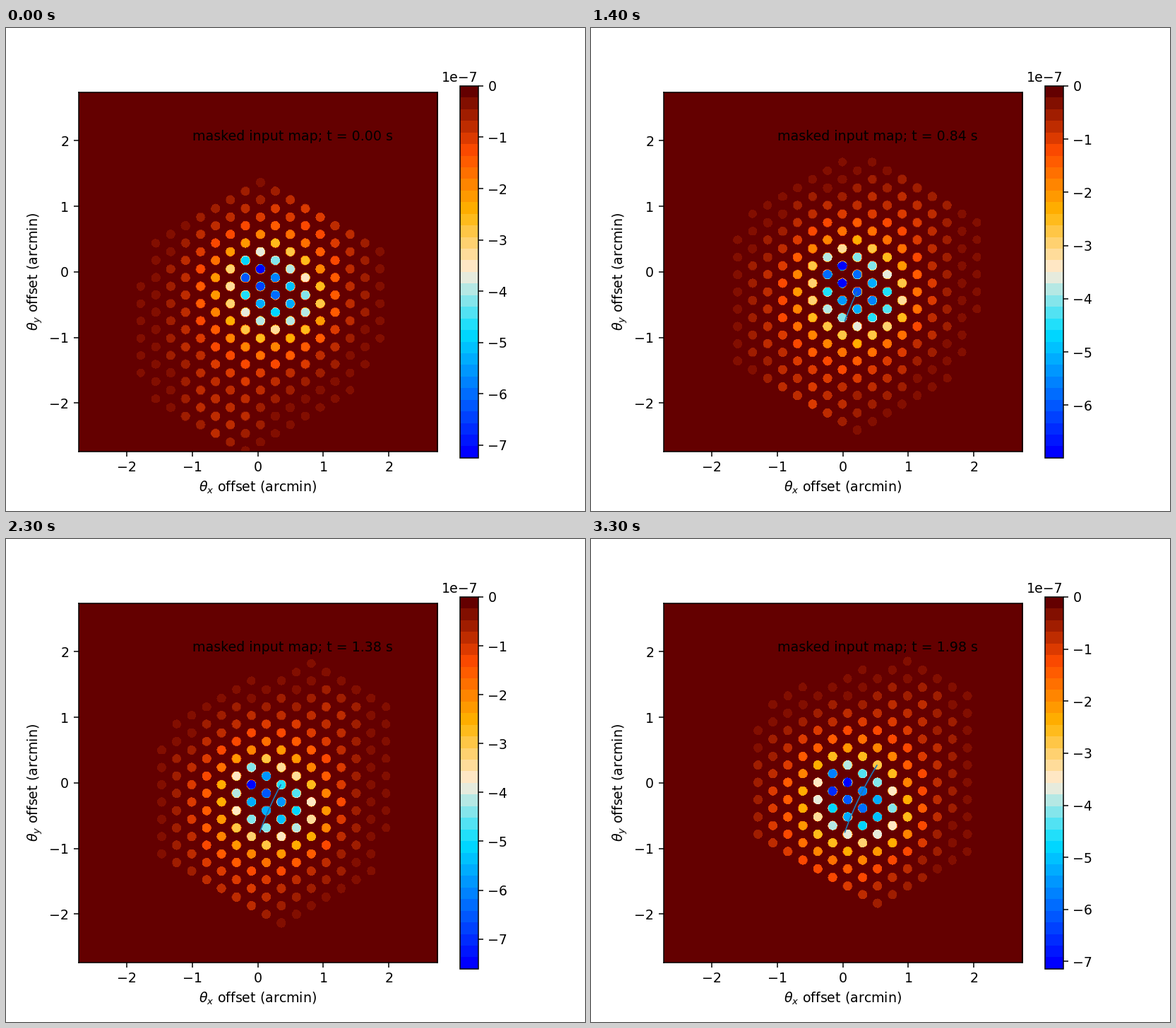
A matplotlib script that plays this animation: 820 by 683 pixels, repeating every 3.4 s.

```python
import numpy as np
import matplotlib.pyplot as plt
from matplotlib.animation import FuncAnimation
from matplotlib.colors import LinearSegmentedColormap

DPI = 820 / 6
FRAMES, INTERVAL, DT = 34, 100, 0.06
HALF = 2.74              # half width of the map, arcmin
GRID = 550               # map samples per side
PITCH = 0.2633           # detector spacing, arcmin
COL = PITCH * np.sqrt(3) / 2
RINGS, RADIUS = 8, 0.071

SKY = LinearSegmentedColormap.from_list(
    "sky", ["#0000ff", "#0070ff", "#00ddff", "#ffedd9", "#ffb400", "#ff4b00", "#640000"], N=32)


def bump(x, y, x0, y0, width):
    return np.exp(-((x - x0) ** 2 + (y - y0) ** 2) / (2 * width ** 2))


def signal(x, y):
    """Depth of the map: a broad beta profile with a core, a shoulder and wings."""
    r2 = (x - 0.143) ** 2 + (y + 0.27) ** 2
    halo = 5.5 * (1 + r2 / 1.08 ** 2) ** -2.25
    core = 3.3 * bump(x, y, -0.072, 0.011, 0.162)
    shoulder = 1.3 * bump(x, y, 0.64, -0.507, 0.30)
    clump = 0.45 * bump(x, y, -0.61, -2.23, 0.33)
    tail = 0.35 * bump(x, y, -0.5, -1.7, 0.9)
    wing = 0.42 * bump(x, y, 1.2, 1.1, 0.5)
    return 1e-7 * (halo + core + shoulder + clump + tail + wing)


def center(step):
    """Slightly curved scan of the array over the sky."""
    x = 0.030 + 0.01165 * step + 0.000097 * step ** 2
    y = -0.751 + 0.03247 * step - 0.0000485 * step ** 2
    return x, y


axis = (np.arange(GRID) + 0.5) / GRID * 2 * HALF - HALF
gx, gy = np.meshgrid(axis, axis)


def masked_map(step):
    """Map seen through the hexagonal detector array."""
    cx, cy = center(step)
    u, v = (gx - cx) / COL, (gy - cy) / PITCH
    col = np.round(u)
    shift = col % 2 / 2
    row = np.round(v - shift) + shift
    inside = (abs(col) <= RINGS) & (abs(row) + abs(col) / 2 <= RINGS)
    seen = inside & (np.hypot((u - col) * COL, (v - row) * PITCH) < RADIUS)
    data = np.zeros_like(gx)
    data[seen] = -signal(cx + col[seen] * COL, cy + row[seen] * PITCH)
    return data


fig, ax = plt.subplots(figsize=(820.001 / DPI, 683.001 / DPI), dpi=DPI)
start = masked_map(0)
image = ax.imshow(start, cmap=SKY, vmin=start.min(), vmax=0, origin="lower",
                  extent=(-HALF, HALF, -HALF, HALF))
fig.colorbar(image)
track, = ax.plot([], [], color="C0", lw=0.9)
label = ax.text(-1, 2, "")
ax.set(xlim=(-HALF, HALF), ylim=(-HALF, HALF),
       xlabel=r"$\theta_x$ offset (arcmin)", ylabel=r"$\theta_y$ offset (arcmin)")


def update(step):
    data = masked_map(step)
    image.set_data(data)
    image.set_clim(data.min(), 0)
    track.set_data(*center(np.arange(step + 1)))
    label.set_text(f"masked input map; t = {step * DT:.2f} s")
    return image, track, label


anim = FuncAnimation(fig, update, frames=FRAMES, interval=INTERVAL,
                     repeat=True, repeat_delay=0, blit=False)
plt.show()
```
